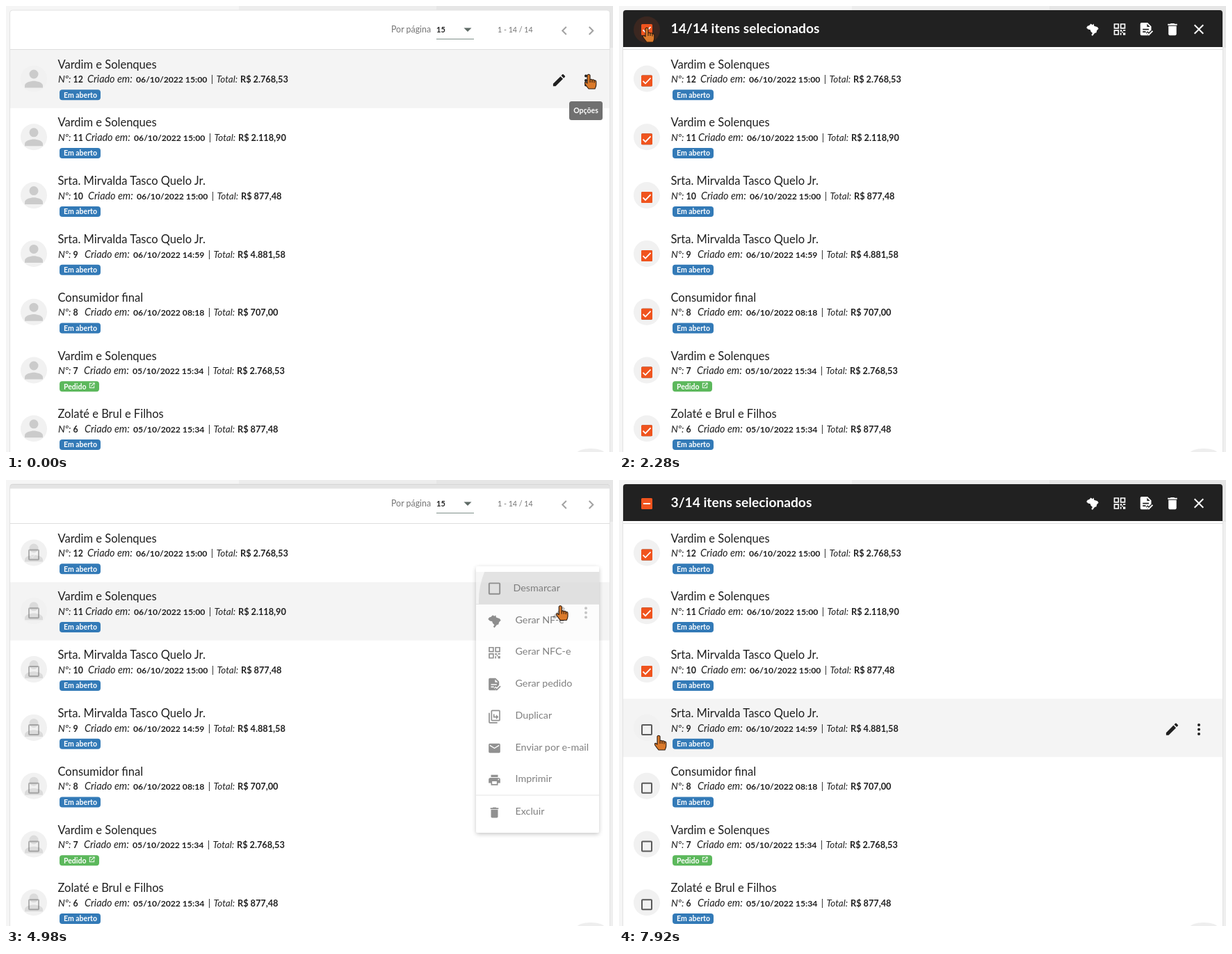
An HTML page for the animation above (7.99 s loop, 873 by 641 pixels).

```html
<!DOCTYPE html>
<html lang="pt-BR">
<head>
<meta charset="utf-8">
<title>Lista de pedidos</title>
<style>
html, body { margin: 0; width: 100%; height: 100%; overflow: hidden; background: #fff; }
svg { display: block; width: 100%; height: 100%; font-family: Lato, sans-serif; }
text { white-space: pre; }
.b { font-weight: 700; }
.i { font-style: italic; }
</style>
</head>
<body>
<svg id="stage" viewBox="0 0 873 641" xmlns="http://www.w3.org/2000/svg"></svg>
<script>
const LOOP = 7990, PITCH = 83.8, DARK = '#202020', ORANGE = '#f0541e';

const ICONS = {
  pencil: 'M3 17.25V21h3.75L17.81 9.94l-3.75-3.75L3 17.25zM20.71 7.04a1 1 0 0 0 0-1.41l-2.34-2.34a1 1 0 0 0-1.41 0l-1.83 1.83 3.75 3.75z',
  trash: 'M6 19c0 1.1.9 2 2 2h8c1.1 0 2-.9 2-2V7H6zM19 4h-3.5l-1-1h-5l-1 1H5v2h14z',
  close: 'M19 6.4L17.6 5 12 10.6 6.4 5 5 6.4l5.6 5.6L5 17.6 6.4 19l5.6-5.6 5.6 5.6 1.4-1.4-5.6-5.6z',
  mail: 'M20 4H4a2 2 0 0 0-2 2v12a2 2 0 0 0 2 2h16a2 2 0 0 0 2-2V6a2 2 0 0 0-2-2zm0 4l-8 5-8-5V6l8 5 8-5z',
  print: 'M19 8H5a3 3 0 0 0-3 3v6h4v4h12v-4h4v-6a3 3 0 0 0-3-3zm-3 11H8v-5h8zm3-7a1 1 0 1 1 0-2 1 1 0 0 1 0 2zM18 3H6v4h12z',
  person: 'M12 12a4 4 0 1 0 0-8 4 4 0 0 0 0 8zm0 2c-2.7 0-8 1.3-8 4v2h16v-2c0-2.7-5.3-4-8-4z',
  box: 'M5 3h14a2 2 0 0 1 2 2v14a2 2 0 0 1-2 2H5a2 2 0 0 1-2-2V5a2 2 0 0 1 2-2zm0 2v14h14V5z',
  boxOn: 'M5 3h14a2 2 0 0 1 2 2v14a2 2 0 0 1-2 2H5a2 2 0 0 1-2-2V5a2 2 0 0 1 2-2zm5 14l9-9-1.4-1.4-7.6 7.6-3.6-3.6L5 12z',
  prev: 'M15.4 7.4L14 6l-6 6 6 6 1.4-1.4-4.6-4.6z',
  next: 'M10 6L8.6 7.4l4.6 4.6-4.6 4.6L10 18l6-6z',
  map: 'M9 2l3 2 2-2 1 4 6 2 2 3-3 3-1 4-3 1-4 5-2-2 2-3-3-3-1-3-4-1-3-3 2-3 3-1z',
  grid: 'M2 2h9v9H2zM4 4v5h5V4zM13 2h9v9h-9zM15 4v5h5V4zM2 13h9v9H2zM4 15v5h5v-5zM13 13h3v3h-3zM18 13h4v2h-4zM16 16h2v2h-2zM13 18h2v4h-2zM18 18h4v4h-4z',
  doc: 'M4 1h10l6 6v6l-4 4-2-2-3 3 4 4H4a2 2 0 0 1-2-2V3a2 2 0 0 1 2-2zM13 3v5h5zM6 11v2h10v-2zM6 15v2h5v-2zM16 22.5l-4-4 1.5-1.5 2.5 2.5 5.5-5.5L23 15.5z',
  copy: 'M8 1h12a2 2 0 0 1 2 2v15a2 2 0 0 1-2 2H8a2 2 0 0 1-2-2V3a2 2 0 0 1 2-2zm0 2v15h12V3zM2 6h2v16h13v2H4a2 2 0 0 1-2-2zM10 8h2v4h3V9l4 4-4 4v-3h-5z',
  link: 'M4 4h8v2H6v12h12v-6h2v8H4zM14 3h7v7h-2V6.5L10.5 15 9 13.5 17.5 5H14z'
};

const BIG = 'Vardim e Solenques', MISS = 'Srta. Mirvalda Tasco Quelo Jr.';
// name, number, x of the date label, date, total
const ROWS = [
  [BIG, 12, 117, '06/10/2022 15:00', '2.768,53'],
  [BIG, 11, 114, '06/10/2022 15:00', '2.118,90'],
  [MISS, 10, 118, '06/10/2022 15:00', '877,48'],
  [MISS, 9, 113, '06/10/2022 14:59', '4.881,58'],
  ['Consumidor final', 8, 113, '06/10/2022 08:18', '707,00'],
  [BIG, 7, 112, '05/10/2022 15:34', '2.768,53'],
  ['Zolaté e Brul e Filhos', 6, 113, '05/10/2022 15:34', '877,48']
];
const MENU = [['map', 'Gerar NF-e'], ['grid', 'Gerar NFC-e'], ['doc', 'Gerar pedido'], ['copy', 'Duplicar'],
  ['mail', 'Enviar por e-mail'], ['print', 'Imprimir'], ['trash', 'Excluir']];

const icon = (name, x, y, size, fill, extra = '') =>
  `<path d="${ICONS[name]}" fill-rule="evenodd" fill="${fill}" transform="translate(${x - size / 2} ${y - size / 2}) scale(${size / 24})" ${extra}/>`;
const text = (x, y, size, s, fill = DARK, cls = '', extra = '') =>
  `<text x="${x}" y="${y}" font-size="${size}" fill="${fill}" class="${cls}" ${extra}>${s}</text>`;
const rect = (x, y, w, h, fill, extra = '') =>
  `<rect x="${x}" y="${y}" width="${w}" height="${h}" fill="${fill}" ${extra}/>`;
const mark = (d, cls) => `<path class="${cls}" d="${d}" fill="none" stroke="#fff" stroke-width="1.8"/>`;
const TICK = 'M-5.5 .3L-2 3.8L5.5-4', DASH = 'M-5 0H5';

function badge(green) {
  const shape = rect(77, 120.3, green ? 57 : 59, 15, green ? '#5cb85c' : '#337ab7', 'rx="4"');
  return shape + text(83, 131.5, 10.5, green ? 'Pedido' : 'Em aberto', '#fff', 'b') +
    (green ? icon('link', 123.5, 126.5, 11, '#fff') : '');
}

function row([name, num, x, date, total], i) {
  return `<g transform="translate(0 ${i * PITCH})">
    <circle cx="40" cy="104.5" r="19" fill="#f1f1f1"/>
    <g class="face">${icon('person', 40, 104.5, 39, '#cbcbcb')}</g>
    <g class="check" transform="translate(40 107.5)">
      ${rect(-7, -7, 14, 14, 'none', 'rx="1" stroke="#5a5a5a" stroke-width="2"')}
      <g class="fill">${rect(-8, -8, 16, 16, ORANGE, 'rx="1.5"')}</g>${mark(TICK, 'tick')}
    </g>
    ${text(74.5, 89.5, 16.5, name)}
    ${text(75, 110.3, 13.8, 'Nº:', DARK, 'i')}${text(96.5, 110.3, 12.3, num, DARK, 'b')}
    ${text(x, 110.3, 14.4, 'Criado em:', DARK, 'i')}${text(x + 70, 110.3, 12.2, date, DARK, 'b')}
    ${text(x + 177.8, 110.3, 13, '|')}${text(x + 185.5, 110.3, 13.4, 'Total:', DARK, 'i')}
    ${text(x + 220, 110.3, 12.7, 'R$ ' + total, DARK, 'b')}
    ${badge(num === 7)}
  </g>`;
}

function menuItem([name, label], i) {
  const y = 77.5 + i * 45.75 + (i === 6 ? 1 : 0);
  return icon(name, 26.5, y + 1, 20, '#6b6b6b') + text(56.5, y + 4, 14.3, label, '#555');
}

const stage = document.getElementById('stage');
stage.innerHTML = `
  <defs>
    <clipPath id="card"><rect x="6" y="6" width="862" height="700" rx="4"/></clipPath>
    <clipPath id="item"><rect y="8" width="177" height="46"/></clipPath>
    <filter id="shade" x="-20%" y="-20%" width="140%" height="140%">
      <feDropShadow dx="0" dy="2" stdDeviation="3" flood-opacity=".3"/></filter>
  </defs>
  ${rect(0, 0, 873, 641, '#f5f5f5')}${rect(335, 0, 284, 20, '#ededed')}${rect(619, 0, 254, 60, '#e6e6e6')}
  ${rect(868, 60, 5, 581, '#efefef')}
  ${rect(5.5, 6, 863, 700, '#fff', 'rx="4" stroke="#e2e2e2"')}
  ${rect(6, 62, 862, 1, '#dedede')}
  ${text(554, 38.3, 12.4, 'Por página', '#757575')}${text(619, 38.3, 11, '15', DARK, 'b')}
  <path d="M658.5 31.5h11l-5.5 5.5z" fill="#5f6b66"/>${rect(619, 47, 54, 1, '#7f918a')}
  ${text(707, 37.5, 10.7, '1 - 14 / 14', '#757575')}
  ${icon('prev', 803, 35.5, 25, '#a3a3a3')}${icon('next', 841.5, 35.5, 25, '#a3a3a3')}
  <rect id="hover" x="6" width="862" height="${PITCH}" fill="#f4f4f4"/>
  ${ROWS.map(row).join('')}
  <ellipse cx="841" cy="643" rx="20" ry="7" fill="#eeeeee"/>
  <g id="tools">${icon('pencil', 795.5, 106.7, 23, DARK)}
    ${[-6.5, 0, 6.5].map(d => `<circle cx="834" cy="${107 + d}" r="2" fill="${DARK}"/>`).join('')}</g>
  <g clip-path="url(#card)"><g id="bar">
    ${rect(6, 6, 862, 53, '#212121')}
    <circle id="pulse" cx="40" cy="34" fill="${ORANGE}"/>
    <g transform="translate(40 34)"><g id="headFill">${rect(-8, -8, 16, 16, ORANGE, 'rx="1.5"')}</g>
      ${mark(TICK, 'headTick')}${mark(DASH, 'headDash')}</g>
    ${text(74.5, 39.2, 19.2, '', '#fff', 'b', 'id="label"')}
    <g id="actions">${icon('map', 681, 33.5, 19, '#fff')}${icon('grid', 720, 33.5, 20, '#fff')}
      ${icon('doc', 758.5, 33.5, 21, '#fff')}${icon('trash', 796, 33.5, 23, '#fff')}</g>
    ${icon('close', 834, 33.5, 24, '#fff')}
  </g></g>
  <g id="tip">${rect(810, 137, 48, 27, '#707070', 'rx="3.5"')}
    ${text(834, 153.7, 10.5, 'Opções', '#fff', 'b', 'text-anchor="middle"')}</g>
  <g id="menu">
    ${rect(0, 0, 177, 383, '#fff', 'rx="3" filter="url(#shade)"')}
    <rect id="over" width="177" height="46" fill="#f3f3f3"/>
    <circle id="ripple" cx="114" cy="50" fill="#000" fill-opacity=".1" clip-path="url(#item)"/>
    ${rect(0, 54, 177, 1, '#dedede')}${rect(0, 328.5, 177, 1, '#dedede')}
    ${icon('box', 26.5, 32, 23, '#6b6b6b', 'id="boxOff"')}${icon('boxOn', 26.5, 32, 23, '#6b6b6b', 'id="boxOn"')}
    ${text(53.5, 35.5, 14.3, '', '#555', '', 'id="toggle"')}
    ${MENU.map(menuItem).join('')}
  </g>
  <g id="cursor" fill="#db7a2b" stroke="#2a1a10" stroke-width="1.1" stroke-linejoin="round">
    <path id="hand" d="M-2 1.5Q0-1 2 1.5V8Q3.6 6.5 5 8.3Q6.8 7 8 9Q10.5 8.5 10.8 11V15.5Q10.5 18.5 9 21H0Q-2.5 18-5 14.5Q-6.5 11-4 11.3L-2 13ZM2 8V12M5 8.5V12M8 9.2V12.5"/>
    <path id="arrow" d="M0 0V17L4 13.5L6.5 19.5L9 18.3L6.5 12.7H12Z"/>
  </g>`;

const all = sel => [...stage.querySelectorAll(sel)];
const ui = Object.fromEntries(all('[id]').map(e => [e.id, e]));
const faces = all('.face'), checks = all('.check'), fills = all('.fill'), ticks = all('.tick');
const headTick = all('.headTick')[0], headDash = all('.headDash')[0];

const put = (el, attrs) => { for (const k in attrs) el.setAttribute(k, attrs[k]); };
const fade = (el, o) => put(el, { opacity: o, visibility: o > 0 ? 'visible' : 'hidden' });
const ramp = (t, start, len) => Math.max(0, Math.min(1, (t - start) / len));
const within = (t, spans) => spans.find(([a, b]) => t >= a && t < b);

const EASE = {
  in: u => u * u,
  out: u => 1 - (1 - u) ** 2,
  both: u => u * u * (3 - 2 * u)
};
// cubic-bezier(.4, 0, .2, 1)
function standard(x) {
  let lo = 0, hi = 1, s = x;
  for (let n = 0; n < 20; n++) {
    s = (lo + hi) / 2;
    if (1.2 * s * (1 - s) ** 2 + .6 * s * s * (1 - s) + s ** 3 < x) lo = s; else hi = s;
  }
  return s * s * (3 - 2 * s);
}

// moves of the pointer: begin, end, x, y, easing
const START = [838, 98];
const MOVES = [
  [480, 920, 790, 172, 'both'], [1245, 1430, 504, 128, 'in'], [1430, 1800, 40, 31, 'out'],
  [3050, 3720, 833, 109, 'both'], [4010, 4380, 790, 187, 'both'], [4550, 4670, 790, 172, 'both'],
  [4930, 4980, 797, 180, 'in'], [4980, 5330, 834, 272, 'out'], [5800, 5930, 829, 305, 'in'],
  [5930, 6200, 770, 334, 'out'], [6810, 7550, 40, 190, 'both'], [7660, 7900, 57, 367, 'both']
];
function pointer(t) {
  let [x, y] = START;
  for (const [a, b, tx, ty, ease] of MOVES) {
    if (t < a) break;
    const u = EASE[ease](ramp(t, a, b - a));
    x += (tx - x) * u;
    y += (ty - y) * u;
  }
  return [x, y];
}

// menus: opened, press, chosen, row
const MENUS = [[400, 1100, 1240, 0], [3970, 4850, 4922, 0], [5740, 6330, 6390, 2]];
const TIPS = [[-500, 420, 0], [3760, 4010, 0], [5340, 5750, 2]];
const ARROWS = [[400, 600], [3970, 4200], [5740, 5960]];
const ALL_ON = 2080, ALL_OFF = 2870;

// time since which a row is selected, or -1
function since(i, t) {
  if (t < ALL_OFF) {
    const a = i ? ALL_ON : 1240;
    return t >= a ? a : -1;
  }
  const a = { 0: 4922, 1: 7620, 2: 6390 }[i];
  return t >= a ? a : -1;
}

function drawChecks(t) {
  const boxes = t < 2931 ? ramp(t, 1254, 120) : t < 4000 ? 1 - ramp(t, 2960, 160) : ramp(t, 4930, 120);
  const leaving = t >= ALL_OFF && t < 4000 ? 1 - ramp(t, 2930, 160) : 0;
  ROWS.forEach((_, i) => {
    const a = since(i, t);
    fade(faces[i], 1 - boxes);
    fade(checks[i], boxes);
    fade(fills[i], a < 0 ? leaving : ramp(t, a + 60, 90));
    fade(ticks[i], a < 0 ? 0 : ramp(t, a, 90));
  });
  return leaving;
}

function drawBar(t, leaving) {
  const p = t < 2931 ? standard(ramp(t, 1254, 250))
    : t < 4000 ? 1 - standard(ramp(t, 2931, 250)) : standard(ramp(t, 4933, 250));
  const full = t >= ALL_ON && t < ALL_OFF;
  const n = full ? 14 : ROWS.filter((_, i) => since(i, t) >= 0).length;
  put(ui.bar, { transform: `translate(0 ${-53 * (1 - p)})` });
  fade(ui.bar, p);
  ui.label.textContent = n === 0 ? 'Nenhum item selecionado'
    : n === 1 ? '1/14 item selecionado' : n + '/14 itens selecionados';
  fade(ui.actions, n ? 1 : 0);
  fade(ui.headFill, n ? 1 : leaving);
  fade(headTick, full ? 1 : 0);
  fade(headDash, n && !full ? 1 : 0);
  const press = t < 2500 ? ALL_ON : ALL_OFF;
  put(ui.pulse, { r: 19 * ramp(t, press - 60, 200) });
  fade(ui.pulse, t < press - 60 ? 0 : .16 * (1 - ramp(t, press + 150, 250)));
}

function drawMenu(t, y) {
  const m = MENUS.find(([a, , c]) => t >= a && t < c + 150);
  if (!m) return fade(ui.menu, 0);
  const [open, press, chosen, r] = m, top = 124 + r * PITCH;
  const e = EASE.out(ramp(t, open + 30, 120));
  put(ui.menu, { transform: `translate(853 ${top}) scale(${.8 + .2 * e}) translate(-177 0)` });
  fade(ui.menu, e * (1 - ramp(t, chosen + 28, 120)));
  const done = t >= chosen;
  ui.toggle.textContent = done ? 'Desmarcar' : 'Marcar';
  fade(ui.boxOff, done ? 1 : 0);
  fade(ui.boxOn, done ? 0 : 1);
  const k = done ? 0 : Math.floor((y - top - 8) / 46);
  put(ui.over, { y: 8 + 46 * k });
  fade(ui.over, k >= 0 && !within(t, ARROWS) ? 1 : 0);
  put(ui.ripple, { r: 125 * EASE.out(ramp(t, press, 200)) });
}

function drawHover(t) {
  const y = pointer(Math.max(0, t - 90))[1];
  const blocked = within(t, MENUS.map(m => [m[0], m[2]]));
  const i = blocked || y < 63 ? -1 : Math.floor((y - 63) / PITCH);
  fade(ui.hover, i < 0 ? 0 : 1);
  fade(ui.tools, i < 0 ? 0 : 1);
  put(ui.hover, { y: 63 + i * PITCH });
  put(ui.tools, { transform: `translate(0 ${i * PITCH})` });

  const tip = TIPS.find(([a, b]) => t >= a && t < b + 140);
  fade(ui.tip, tip ? ramp(t, tip[0], 120) * (1 - ramp(t, tip[1], 130)) : 0);
  if (tip) put(ui.tip, { transform: `translate(0 ${tip[2] * PITCH})` });
}

function draw(t) {
  const [x, y] = pointer(t), arrow = within(t, ARROWS);
  drawHover(t);
  drawBar(t, drawChecks(t));
  drawMenu(t, y);
  put(ui.cursor, { transform: `translate(${x} ${y})` });
  fade(ui.hand, arrow ? 0 : 1);
  fade(ui.arrow, arrow ? 1 : 0);
}

const t0 = performance.now();
function tick(now) {
  draw(Math.max(0, now - t0) % LOOP);
  requestAnimationFrame(tick);
}
draw(0);
requestAnimationFrame(tick);
</script>
</body>
</html>
```
